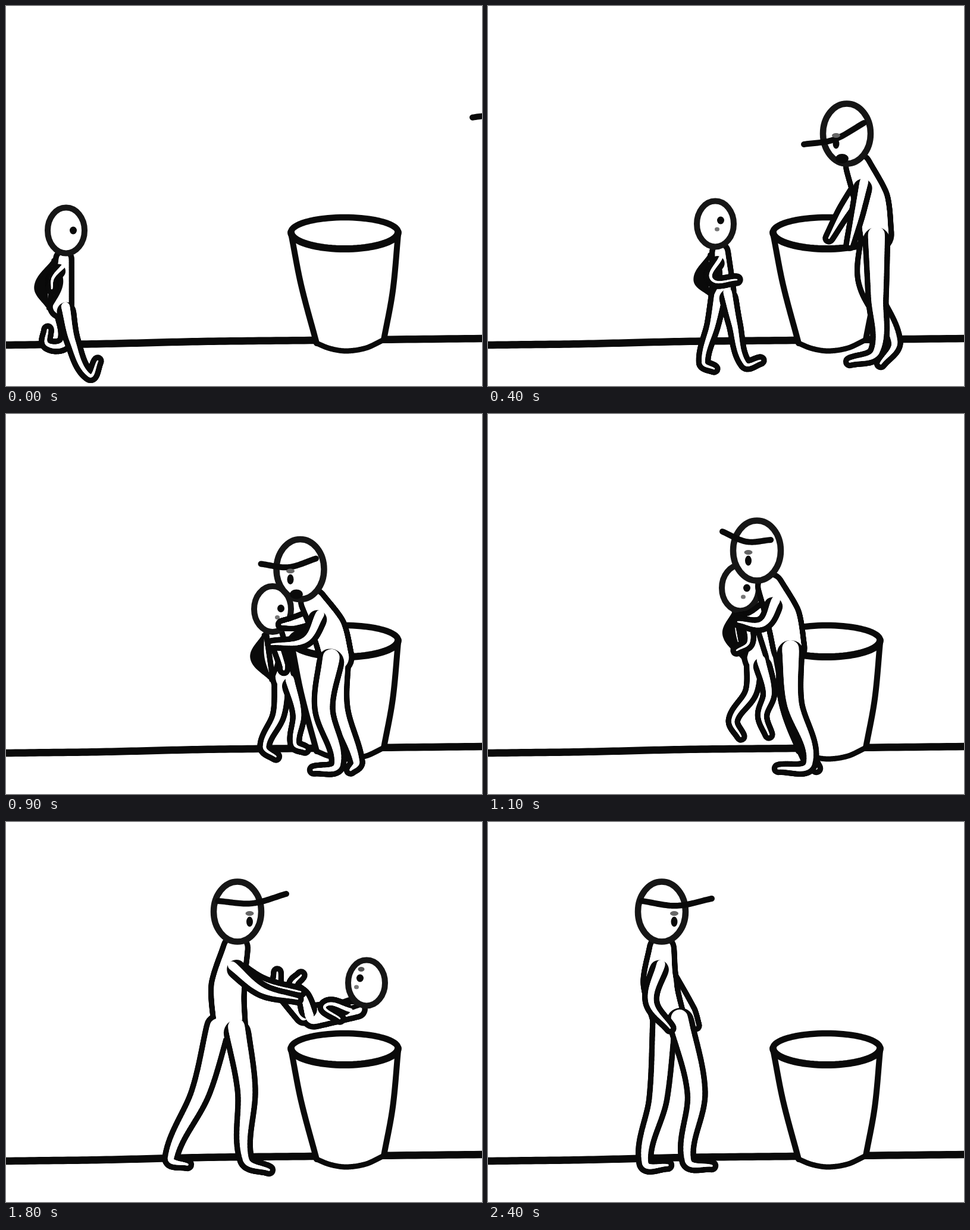
Animation, 800 px wide and 640 px high, one loop 2600 ms. Source, as an HTML page with a canvas:

```html
<!DOCTYPE html>
<html lang="en">
<head>
<meta charset="utf-8">
<title>Bin walk</title>
<style>
  html, body { margin: 0; width: 100%; height: 100%; overflow: hidden; background: #fff; }
  canvas { display: block; }
</style>
</head>
<body>
<canvas id="stage" width="800" height="640"></canvas>
<script>
const ctx = document.getElementById('stage').getContext('2d');
const LOOP = 2600, STEP = 100, LAST = 2400, FLOOR = 610, LINE = 9.4, INK = '#0a0a0a';

const lerp = (a, b, u) => a + (b - a) * u;
const mixPt = (a, b, u) => [lerp(a[0], b[0], u), lerp(a[1], b[1], u)];
const add = (p, x, y) => [p[0] + x, p[1] + y];
const parse = text => text.split(' ').map(p => p.split(',').map(Number));

// Smooth curve through points; each sample carries its position along the list.
function curve(p) {
  const last = p.length - 1, out = [];
  const dir = i => {
    const a = p[Math.max(0, i - 1)], b = p[Math.min(last, i + 1)];
    const d = Math.hypot(b[0] - a[0], b[1] - a[1]) || 1;
    return [(b[0] - a[0]) / d, (b[1] - a[1]) / d];
  };
  for (let i = 0; i < last; i++) {
    const a = p[i], b = p[i + 1], da = dir(i), db = dir(i + 1);
    const h = Math.hypot(b[0] - a[0], b[1] - a[1]) / 3;
    for (let k = i ? 1 : 0; k <= 20; k++) {
      const t = k / 20, s = 1 - t;
      const at = c => s * s * s * a[c] + 3 * s * s * t * (a[c] + da[c] * h)
        + 3 * s * t * t * (b[c] - db[c] * h) + t * t * t * b[c];
      out.push([at(0), at(1), i + t]);
    }
  }
  return out;
}

// Skeletons: joint names, then one key pose per line
const LEGS = ' kneeA ankleA toeA kneeB ankleB toeB';
const MAN = ('head tip neck hip elbowA handA elbowB handB' + LEGS).split(' ');
const KID = ('head eye neck hip elbow hand pack' + LEGS).split(' ');

const pose = (names, text) => {
  const pts = parse(text);
  return Object.fromEntries(names.map((name, i) => [name, pts[i]]));
};
const remap = (src, fn) => Object.fromEntries(Object.entries(src).map(([name, p]) => [name, fn(p, name)]));
const mix = (a, b, u) => remap(a, (p, name) => mixPt(p, b[name], u));
const move = (src, dx, dy = 0, stretch = 1) =>
  remap(src, ([x, y]) => [x + dx, FLOOR + (y - FLOOR) * stretch + dy]);

// Halfway through a walk the legs have changed places.
function stride(a, b) {
  const mid = mix(a, b, .5);
  const other = name => name.replace(/[AB]$/, c => c === 'A' ? 'B' : 'A');
  return remap(mid, (p, name) => /^(knee|ankle|toe)/.test(name) ? mid[other(name)] : p);
}

const man = text => pose(MAN, text);
const manBin = man('603,215 531,233 622,270 652,385 620,352 608,402 599,345 573,391 654,490 653,582 608,599 638,465 683,565 660,602');
const manHug = man('537,293 463,307 558,342 604,425 543,408 472,426 525,361 507,364 556,505 574,592 546,602 610,505 638,592 606,602');
const manLift = man('452,230 394,198 474,290 506,395 462,353 420,350 445,342 420,345 512,485 540,588 488,597 508,485 540,580 552,597');
const manCarry = man('389,167 459,136 386,228 382,340 411,290 458,277 430,270 458,270 419,470 420,565 457,590 385,470 372,574 402,553');
const manDrop = man('382,151 464,121 379,212 369,345 406,286 443,326 424,272 452,318 397,450 396,568 435,586 320,455 270,566 298,577');
const manLeave = man('292,151 376,129 292,213 303,330 274,302 306,347 338,318 349,343 350,455 336,570 376,579 286,465 264,574 302,578');
const manEnter = move(manBin, 253, 0, 1.12);
const manThrow = { ...move(manDrop, 7), elbowA: [430, 283], handA: [490, 298], handB: [495, 286] };

const kid = text => pose(KID, text);
const kidWalk = kid('101,378 113,378 97,426 92,506 79,458 77,476 47,473 112,565 140,622 154,598 100,565 70,570 70,545');
const kidMeet = kid('382,367 391,361 390,414 395,482 376,460 418,461 345,462 414,535 432,602 458,597 378,535 362,600 380,611');
const kidHug = kid('472,364 489,362 472,409 484,480 495,461 516,463 426,450 511,540 510,603 533,590 474,545 457,605 482,611');
const kidLift = kid('424,293 435,293 430,334 450,414 438,384 418,398 394,372 472,470 461,508 472,540 442,468 412,515 425,543');
const kidCarry = kid('476,207 488,213 470,257 446,320 482,296 428,322 494,300 447,370 466,414 459,436 428,370 430,404 428,420');
const kidBin = kid('641,326 630,318 625,370 552,382 572,364 596,386 628,348 535,350 518,330 531,313 510,355 492,334 491,308');

const manTrack = [[0, manEnter], [200, stride(manEnter, manBin)], [400, manBin], [700, manHug],
  [1100, manLift], [1200, move(manLift, -10, 0, 1.11)], [1500, manCarry], [1800, manThrow],
  [2000, manDrop], [2400, manLeave]];
const kidTrack = [[0, kidWalk], [200, stride(kidWalk, kidMeet)], [400, kidMeet], [700, kidHug],
  [1100, kidLift], [1200, move(kidLift, -10, 0, 1.11)], [1500, kidCarry],
  [1800, move(kidBin, -35, -55)], [2000, kidBin], [2300, move(kidBin, -10, 120)]];

function poseAt(track, t) {
  let i = 0;
  while (i < track.length - 2 && t >= track[i + 1][0]) i++;
  const [ta, a] = track[i], [tb, b] = track[i + 1];
  return mix(a, b, Math.min(1, (t - ta) / (tb - ta)));
}

function line(pts, width = LINE, color = INK) {
  ctx.beginPath();
  pts.forEach(p => ctx.lineTo(p[0], p[1]));
  ctx.lineWidth = width;
  ctx.strokeStyle = color;
  ctx.stroke();
}

function dot(p, rx, ry, fill = INK, width = 0) {
  ctx.beginPath();
  ctx.ellipse(p[0], p[1], rx, ry, 0, 0, Math.PI * 2);
  ctx.fillStyle = fill;
  ctx.fill();
  if (!width) return;
  ctx.lineWidth = width;
  ctx.strokeStyle = '#161616';
  ctx.stroke();
}

// Tapered tube along a curve, grown or shrunk by a margin
function tube({ path, radii }, margin, color, from = 0) {
  for (let i = Math.max(1, from); i < path.length; i++) {
    const s = Math.min(path[i][2], radii.length - 1.001), k = Math.floor(s);
    line([path[i - 1], path[i]], 2 * (lerp(radii[k], radii[k + 1], s - k) + margin), color);
  }
}

const limb = (points, radii) => ({ path: curve(points), radii });

// Outlines several limbs as one shape; an open one keeps its root unclosed.
function flesh(limbs, open) {
  for (const part of limbs) {
    const root = part.path[0];
    const skip = open ? part.path.findIndex(p => Math.hypot(p[0] - root[0], p[1] - root[1]) > 12) : 0;
    tube(part, LINE / 2, INK, skip);
  }
  for (const part of limbs) tube(part, -LINE / 2, '#fff');
}

function leg(p, side, radii) {
  const knee = p['knee' + side];
  const root = [lerp(p.hip[0], knee[0], .4), p.hip[1]];
  return limb([root, knee, p['ankle' + side], p['toe' + side]], radii);
}

function drawMan(p, t) {
  const reach = p.tip[0] - p.head[0];
  const chest = add(mixPt(p.neck, p.hip, .5), -reach * .1, 0);
  const shoulder = mixPt(p.neck, chest, .45);
  const legSize = [19, 15, 10, 6.5], armSize = [12, 9.5, 6];
  const arm = side => limb([shoulder, p['elbow' + side], p['hand' + side]], armSize);

  flesh([arm('B')], true);
  flesh([leg(p, 'B', legSize), limb([p.neck, chest, p.hip], [20, 28, 26])]);
  flesh([leg(p, 'A', legSize)], true);
  flesh([arm('A')], true);

  dot(p.head, 40, 50.5, '#fff', 10.5);
  const band = [p.head[0] - reach * .4, p.head[1] - 18];
  line(curve([band, add(mixPt(band, p.tip, .5), 0, 10), p.tip]), 10);
  const eye = add(p.head, reach * .25, 17);
  dot(add(eye, 0, -14), 7, 4, '#666');
  dot(eye, 5.5, 8.5);
  if (t < 1000) dot(add(eye, 10, 25), 11, 8);
}

function drawPack(p) {
  const middle = mixPt(p.neck, p.hip, .5);
  const dx = p.pack[0] - middle[0], dy = p.pack[1] - middle[1];
  const top = add(p.neck, dx * .35, dy * .35), bottom = add(p.hip, dx * .42, dy * .42);
  const through = k => curve([top, add(middle, dx * k, dy * k), bottom]);
  ctx.beginPath();
  [...through(.93), ...through(.5).reverse()].forEach(q => ctx.lineTo(q[0], q[1]));
  ctx.fillStyle = INK;
  ctx.fill();
  line(through(.93), 6);
  line(through(.05), 8);
}

function drawKid(p, t) {
  const legSize = [12, 9.5, 7.5, 6];
  flesh([leg(p, 'B', legSize), limb([p.neck, p.hip], [13, 18])]);
  flesh([leg(p, 'A', legSize)], true);
  drawPack(p);
  flesh([limb([mixPt(p.neck, p.hip, .15), p.elbow, p.hand], [8, 7, 6])], true);

  dot(p.head, 31, 38.5, '#fff', 10);
  const eyes = t >= 1300 && t < 1700 ? [p.eye, add(p.eye, -33, -6)] : [p.eye];
  for (const eye of eyes) {
    dot(eye, 6, 6.5);
    if (t >= 1300) dot(add(eye, 2, -15), 5.5, 4, '#555');
  }
  if (t >= 300) dot(add(p.eye, -6, 15), 4, 3.5, '#777');
}

// Bin: a tapered cup with an elliptical rim
const RIM = { x: 569, y: 381, rx: 90, back: 25, front: 28 };
const rimArc = sign => Array.from({ length: 41 }, (_, i) => {
  const a = Math.PI * (1 - i / 40);
  return [RIM.x + RIM.rx * Math.cos(a), RIM.y + sign * (sign < 0 ? RIM.back : RIM.front) * Math.sin(a)];
});
const rimBack = rimArc(-1), rimFront = rimArc(1);
const sides = curve(parse('480,388 496,470 522,568'));
const rightSide = curve(parse('659,385 650,480 635,562'));
const base = curve(parse('522,568 545,577 572,581 605,576 635,562'));
const ground = curve(parse('0,571 160,569 330,565 520,563 800,560'));

function fillWhite(pts) {
  ctx.beginPath();
  pts.forEach(p => ctx.lineTo(p[0], p[1]));
  ctx.fillStyle = '#fff';
  ctx.fill();
}

function binBack() {
  fillWhite([...rimBack, ...rimFront.slice().reverse()]);
  line(rimBack, 10.5);
}

function binFront() {
  fillWhite([...rimFront, ...rightSide, ...base.slice().reverse(), ...sides.slice().reverse()]);
  line(sides, 10);
  line(rightSide, 10);
  line(base, 9);
  line(rimFront, 12);
}

function draw(t) {
  ctx.fillStyle = '#fff';
  ctx.fillRect(0, 0, 800, 640);
  ctx.lineCap = ctx.lineJoin = 'round';
  line(ground, 12.5);
  const inBin = t >= 1800;
  binBack();
  if (!inBin) binFront();
  if (t < 2300) drawKid(poseAt(kidTrack, t), t);
  if (inBin) binFront();
  drawMan(poseAt(manTrack, t), t);
}

const start = performance.now();
function tick() {
  const t = (performance.now() - start) % LOOP;
  draw(Math.min(LAST, Math.floor(t / STEP) * STEP));
  requestAnimationFrame(tick);
}
tick();
</script>
</body>
</html>
```
